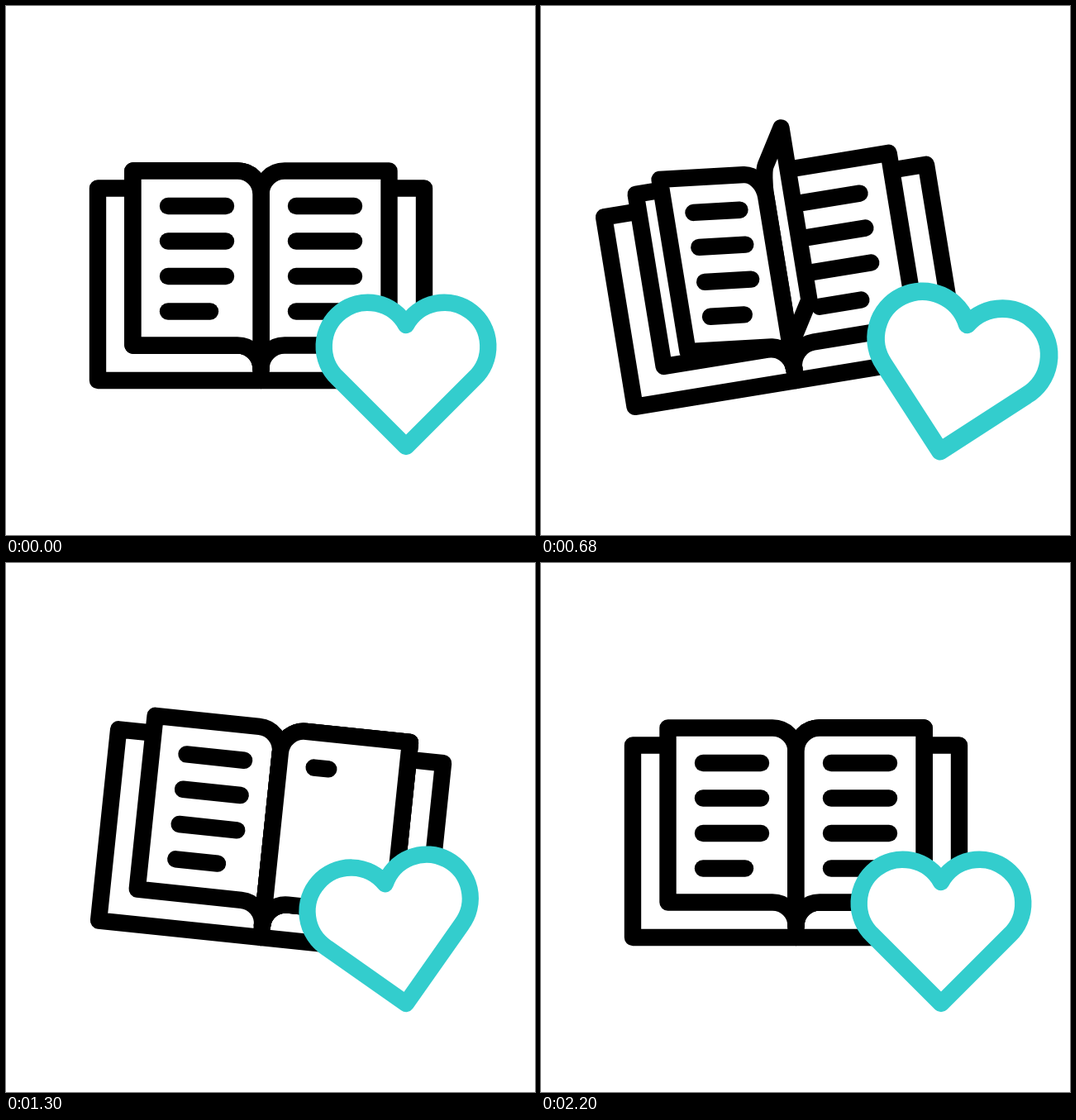
These frames come from a looping animation (640 by 640 pixels, 2.4 s). An HTML page with a canvas:

```html
<!DOCTYPE html>
<html lang="en">
<head>
<meta charset="utf-8">
<title>Favourite book</title>
<style>
  html, body { margin: 0; width: 100%; height: 100%; overflow: hidden; background: #fff; }
  canvas { display: block; width: 640px; height: 640px; }
</style>
</head>
<body>
<canvas id="stage" width="640" height="640"></canvas>
<script>
const ctx = document.getElementById('stage').getContext('2d');
const LOOP = 2400, SPINE = 308.5, BASE = 453, PAGE_WIDTH = 155, LIFT = 64;
const LINES = [[242, 70], [284.5, 70], [327, 70], [369.5, 51]];

const clamp = x => Math.min(1, Math.max(0, x));
const smooth = x => x * x * (3 - 2 * x);
const linear = x => x;

// Interpolates between [time, value, easing into this key] entries.
function track(t, keys) {
  let value = keys[0][1];
  for (let i = 1; i < keys.length; i++) {
    const [t0, v0] = keys[i - 1], [t1, v1, ease = smooth] = keys[i];
    if (t >= t0) value = v0 + (v1 - v0) * ease(clamp((t - t0) / (t1 - t0)));
  }
  return value;
}

const bookAngle = t => track(t, [[180, 0], [780, -10], [1180, 8], [1680, -5.9], [2180, 0]]);
const heartAngle = t => track(t, [[180, 0], [680, 12.1], [1180, -13], [1680, 7.9], [2180, 0]]);
const heartScale = t => 1 + 0.13 * track(t, [
  [180, 0], [380, 1], [580, 0], [780, 1], [980, 0],
  [1380, 0], [1580, 1], [1780, 0], [1980, 1], [2180, 0]]);
// -1 lies on the left, 0 stands upright, 1 lies on the right.
const pageTurn = t => track(t, [[200, -1], [600, 0, linear], [880, 1]]);

// Builds a path in page space, where x is the distance from the spine.
function onPage(turn, build) {
  ctx.save();
  ctx.transform(turn, -LIFT * (1 - Math.abs(turn)) / PAGE_WIDTH, 0, 1, SPINE, 0);
  ctx.beginPath();
  build();
  ctx.restore();
}

function page(turn) {
  const r = 28.5, top = 199.5, bottom = 410.5;
  onPage(turn, () => {
    ctx.arc(r, bottom + r, r, Math.PI, 1.5 * Math.PI);
    ctx.lineTo(PAGE_WIDTH, bottom);
    ctx.lineTo(PAGE_WIDTH, top);
    ctx.arc(r, top + r, r, 1.5 * Math.PI, Math.PI, true);
    ctx.closePath();
  });
  ctx.fill();
  ctx.stroke();
}

// Lines of text run from distance `from`, towards the spine on the left page.
function text(turn, from, direction, amount = () => 1) {
  LINES.forEach(([y, length], i) => {
    const part = amount(i);
    if (part <= 0) return;
    onPage(turn, () => {
      ctx.moveTo(from, y);
      ctx.lineTo(from + direction * length * part, y);
    });
    ctx.stroke();
  });
}

function leftPage(turn) {
  page(turn);
  if (turn < 0) text(turn, 112.5, -1);
}

function polyline(...points) {
  ctx.beginPath();
  points.forEach(p => ctx.lineTo(...p));
  ctx.stroke();
}

function drawBook(t) {
  ctx.save();
  ctx.translate(SPINE, BASE);
  ctx.rotate(bookAngle(t) * Math.PI / 180);
  ctx.translate(-SPINE, -BASE);
  ctx.strokeStyle = '#000';

  polyline([153, 220.5], [111, 220.5], [111, BASE], [506, BASE], [506, 220.5], [464, 220.5]);
  polyline([SPINE, 420], [SPINE, BASE]);
  leftPage(-1);
  page(1);
  text(1, 42.5, 1);

  const first = pageTurn(t), second = pageTurn(t - 400);
  (first < 0 ? [second, first] : [first, second]).forEach(leftPage);
  text(1, 42.5, 1, i => clamp((t - 1200 - 200 * i) / 400));
  ctx.restore();
}

const heart = new Path2D(
  'M484 386A53 53 0 1 0 401.5 450.5L484 533L566.5 450.5A53 53 0 1 0 484 386Z');

function drawHeart(t) {
  const scale = heartScale(t);
  ctx.save();
  ctx.translate(484, 533);
  ctx.rotate(heartAngle(t) * Math.PI / 180);
  ctx.translate(0, -86.5);
  ctx.scale(scale, scale);
  ctx.translate(-484, -446.5);
  ctx.strokeStyle = '#33cdcd';
  ctx.fill(heart);
  ctx.stroke(heart);
  ctx.restore();
}

function frame() {
  const t = performance.now() % LOOP;
  ctx.fillStyle = '#fff';
  ctx.fillRect(0, 0, 640, 640);
  ctx.lineWidth = 20.4;
  ctx.lineCap = ctx.lineJoin = 'round';
  drawBook(t);
  drawHeart(t);
  requestAnimationFrame(frame);
}
frame();
</script>
</body>
</html>
```
